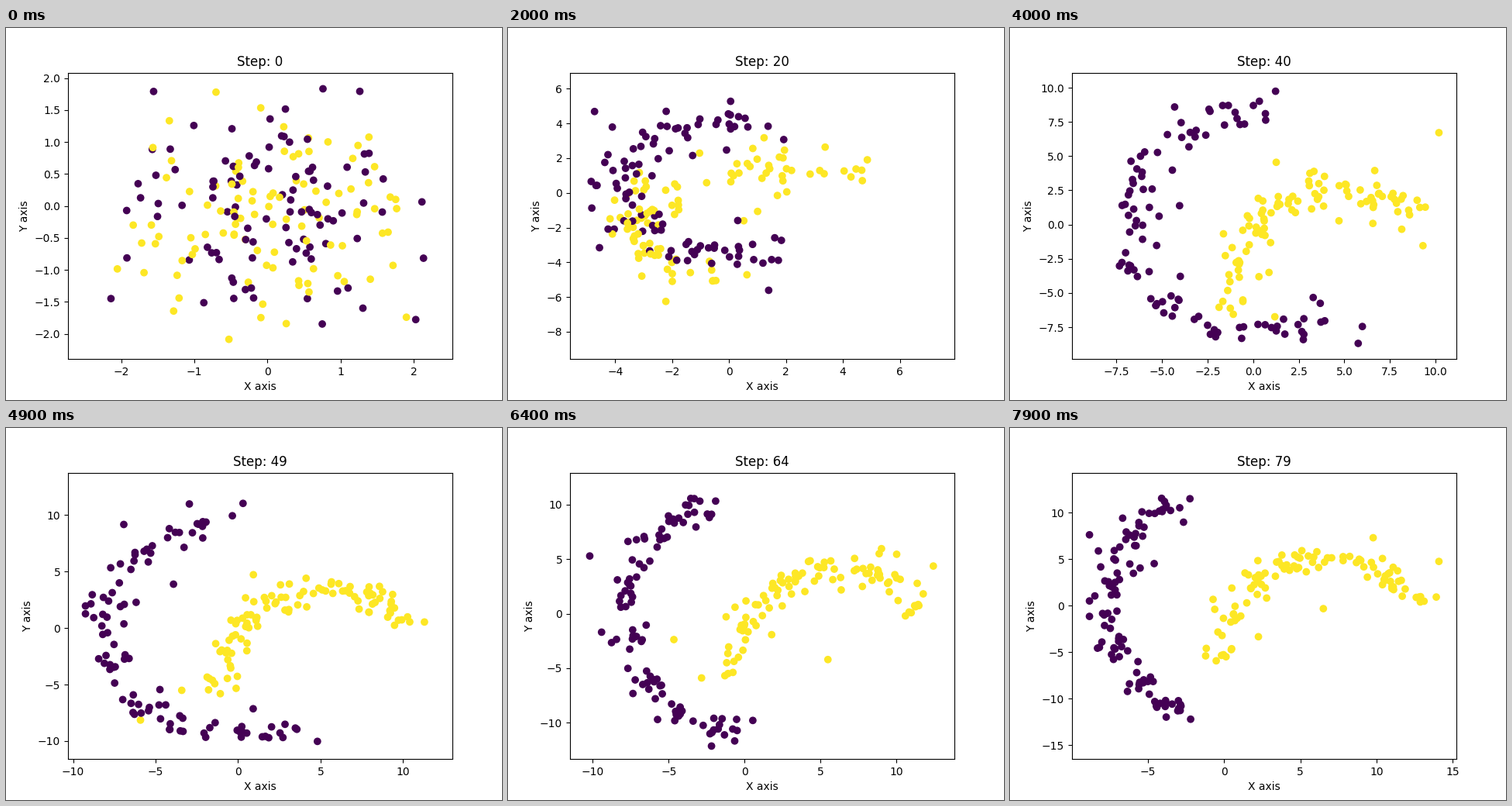
A matplotlib script that plays this animation: 640x480 px, repeating every 8000 ms.

```python
import numpy as np
import matplotlib.pyplot as plt
from matplotlib.animation import FuncAnimation

rng = np.random.default_rng(11)
N = 100             # points per class
GROWTH = 9          # steps for the random start to fade by a factor e
SPREAD = 0.55       # scatter around each moon
DRIFT = 0.12        # radians per step of each point's wandering

# Each moon is an elliptic arc that unfolds:
# step, centre x, centre y, radius x, radius y, first and last angle
PURPLE = [(20, 0.0, 0.4, 4.4, 4.5, 72, 300),
          (32, 0.0, 0.0, 5.7, 6.9, 70, 318),
          (49, 0.0, 0.0, 8.0, 9.4, 95, 296),
          (79, -1.5, 0.0, 6.2, 11.6, 103, 262)]
YELLOW = [(20, 2.8, -2.1, 6.7, 3.9, 60, 245),
          (32, 4.5, -6.0, 5.8, 8.0, 50, 180),
          (49, 5.3, -6.5, 6.6, 9.9, 37, 180),
          (79, 7.0, -6.0, 7.3, 11.3, 27, 180)]

# Axis limits: step, left, right, bottom, top
VIEW = [(0, -2.725, 2.524, -2.396, 2.084),
        (10, -4.52, 5.26, -8.1, 7.18),
        (20, -5.59, 7.92, -9.58, 6.93),
        (32, -9.62, 9.51, -8.26, 8.76),
        (49, -10.31, 12.99, -11.59, 13.73),
        (64, -11.49, 13.81, -13.33, 12.92),
        (79, -9.99, 15.25, -16.51, 14.31)]


def at(table, step):
    """Row of a keyed table, interpolated at a step."""
    t, *cols = np.array(table).T
    return [np.interp(step, t, c) for c in cols]


def data_box(step):
    """Corners of the data area inside the usual 5 % margins."""
    x0, x1, y0, y1 = at(VIEW, step)
    mx, my = (x1 - x0) / 22, (y1 - y0) / 22
    return np.array([x0 + mx, y0 + my]), np.array([x1 - mx, y1 - my])


def random_start():
    lo, hi = data_box(0)
    pool = rng.normal(size=(4 * N, 2))
    inside = ((pool > lo) & (pool < hi)).all(axis=1)
    return pool[inside][:N]


class Moon:
    def __init__(self, arc, clumps):
        self.arc = arc
        self.start = random_start()
        u = rng.random(N)
        turns = 2 * np.pi * clumps
        self.u = u + 0.7 * np.sin(turns * u) / turns
        tail = np.sqrt(4 / rng.chisquare(4, size=(N, 1)))   # a few far strays
        self.wander = tail * rng.normal(size=(2, N, 2))

    def positions(self, step):
        cx, cy, rx, ry, a0, a1 = at(self.arc, step)
        a = np.radians(a0 + (a1 - a0) * self.u)
        line = np.column_stack([cx + rx * np.cos(a), cy + ry * np.sin(a)])
        p, q = self.wander
        noise = p * np.cos(DRIFT * step) + q * np.sin(DRIFT * step)
        fade = np.exp(-step / GROWTH)
        pts = fade * self.start + (1 - fade) * (line + SPREAD * noise)
        return np.clip(pts, *data_box(step))


moons = [Moon(PURPLE, 7), Moon(YELLOW, 8)]
order = rng.permutation(2 * N)
labels = np.repeat([0, 1], N)[order]


def positions(step):
    return np.concatenate([m.positions(step) for m in moons])[order]


fig, ax = plt.subplots(figsize=(6.4, 4.8), dpi=100)
dots = ax.scatter(*positions(0).T, c=labels, cmap="viridis")
ax.set_xlabel("X axis")
ax.set_ylabel("Y axis")


def draw(step):
    x0, x1, y0, y1 = at(VIEW, step)
    dots.set_offsets(positions(step))
    ax.set_xlim(x0, x1)
    ax.set_ylim(y0, y1)
    ax.set_title(f"Step: {step}")
    return dots,


anim = FuncAnimation(fig, draw, frames=80, interval=100,
                     repeat=True, repeat_delay=0)
plt.show()
```
